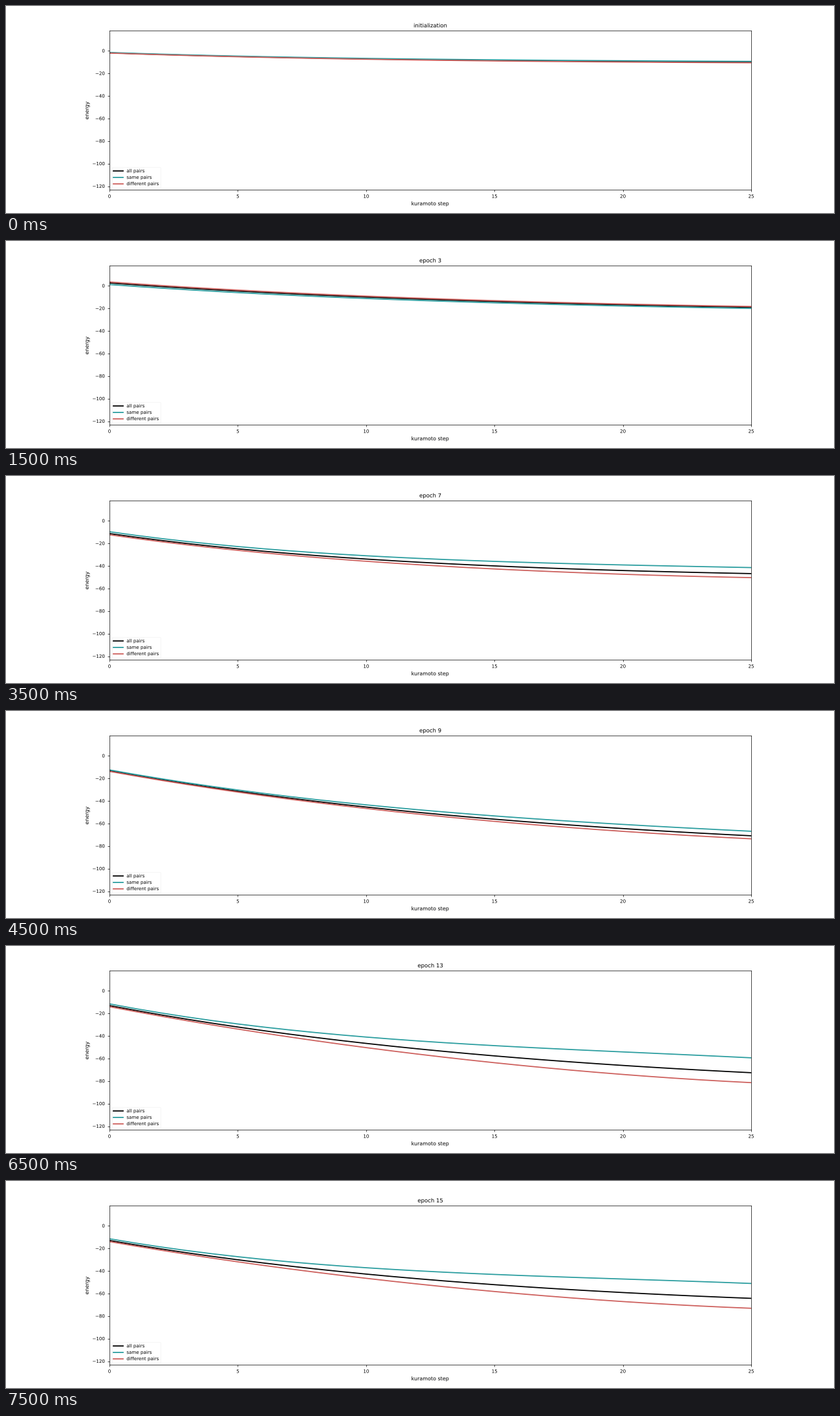
A matplotlib script that plays this animation: 1280 px wide and 320 px high, repeating every 8 s.

```python
import matplotlib.pyplot as plt
import numpy as np
from matplotlib.animation import FuncAnimation
from matplotlib.patheffects import Normal
from matplotlib.text import Text

plt.rcParams.update({
    "font.family": "DejaVu Sans",
    "font.size": 8,
    "axes.titlesize": 9.6,
    "axes.labelsize": 9,
    "xtick.major.pad": 4.5,
    "ytick.major.pad": 4.5,
    "lines.linewidth": 2,
    "figure.subplot.bottom": 0.111,
})

EPOCHS = 16
STEPS = np.arange(26)
PROGRESS = STEPS / STEPS[-1]
SAME_SHARE = 0.4  # fraction of all pairs that belong to the same class

# Key points (epoch, value) of the training run.
START = [(0, -1.8), (3, 2.5), (5, -23.3), (7, -11.3), (9, -13.3), (15, -13)]
END = [(0, -10.1), (1, -17.8), (3, -19), (5, -65.8), (6, -76.3), (7, -46.8),
       (9, -70.9), (10, -61.5), (11, -59.5), (13, -72.6), (14, -64.3)]
RATE = [(0, 2.1), (3, 1.5), (5, 1.4), (7, 2), (9, 1.3), (13, 1.35), (15, 1.5)]
START_GAP = [(0, 0.5), (3, -2.3), (5, 1.2), (7, 2.7), (9, 1.3), (13, 2.5)]
END_GAP = [(0, 1.2), (3, -1.7), (5, 4.1), (7, 8.9), (9, 6.7), (13, 22)]


def at(track, epoch):
    """Value of a key point track, linear between its points."""
    return np.interp(epoch, *zip(*track))


def blend(start, end, ease):
    return start + (end - start) * ease


def energies(epoch):
    """Energy curves of all, same and different pairs."""
    rate = at(RATE, epoch)
    decay = np.expm1(-rate * PROGRESS) / np.expm1(-rate)
    spread = PROGRESS ** 2 * (3 - 2 * PROGRESS)
    mean = blend(at(START, epoch), at(END, epoch), decay)
    gap = blend(at(START_GAP, epoch), at(END_GAP, epoch), spread)
    return mean, mean + (1 - SAME_SHARE) * gap, mean - SAME_SHARE * gap


fig, ax = plt.subplots(figsize=(20, 5), dpi=64)
styles = [("all pairs", "black"),
          ("same pairs", "#2a9d9f"),
          ("different pairs", "#cd5f5c")]
lines = [ax.plot([], [], color=color, label=label)[0] for label, color in styles]

ax.set_xlim(0, 25)
ax.set_ylim(-123.4, 17.7)
ax.set_xticks(range(0, 26, 5))
ax.set_yticks(range(-120, 1, 20))
ax.set_xlabel("kuramoto step")
ax.set_ylabel("energy")
title = ax.set_title("initialization")
ax.legend(loc="lower left", edgecolor="0.95", labelspacing=0.55)

# Draw text as outlines so that it is placed at subpixel positions.
for text in fig.findobj(Text):
    text.set_path_effects([Normal()])


def update(epoch):
    for line, curve in zip(lines, energies(epoch)):
        line.set_data(STEPS, curve)
    title.set_text(f"epoch {epoch}" if epoch else "initialization")
    return [*lines, title]


anim = FuncAnimation(fig, update, frames=EPOCHS, interval=500,
                     repeat=True, repeat_delay=0)
plt.show()
```
